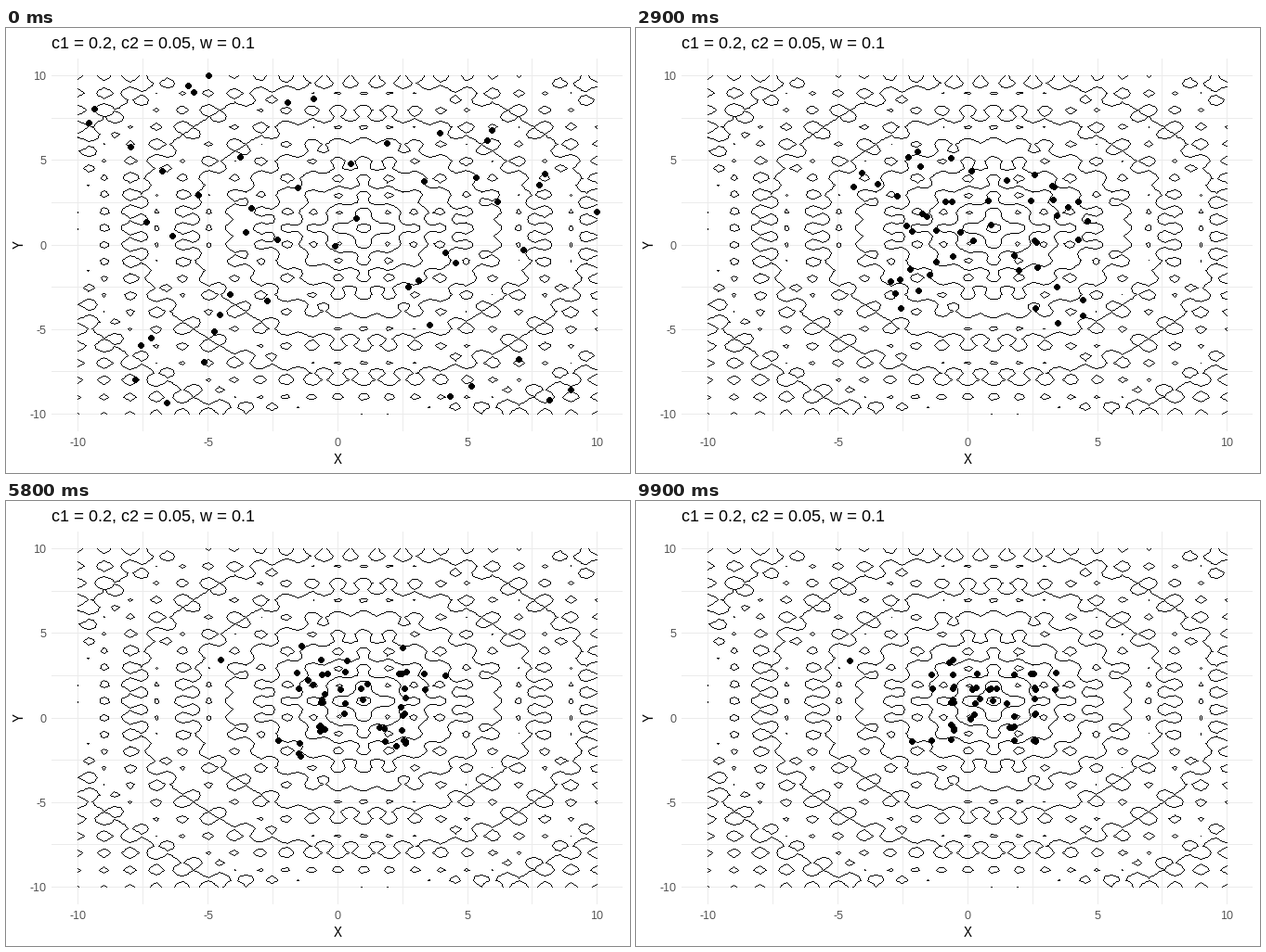
Recreate the animation shown at these times as a matplotlib script. Size 672 px wide and 480 px high, loop 10 s.

```python
import matplotlib.pyplot as plt
import numpy as np
from matplotlib.animation import FuncAnimation
from matplotlib.patches import Circle

W, H, DPI = 672, 480, 96
FRAMES, INTERVAL = 100, 100
PX = 72 / DPI                      # one pixel in points
LEFT, RIGHT, TOP, BOTTOM = 49, 664, 33, 435

# Map from data units to stage pixels
ORIGIN = np.array([357.12, 234.1])
SCALE = np.array([27.98, -18.24])

# Swarm settings
C1, C2, INERTIA = 0.2, 0.05, 0.1
GOAL = np.array([1.0, 1.0])

plt.rcParams.update({
    "font.family": ["Liberation Sans"],
    "text.hinting": "native",
    "text.hinting_factor": 1,
})


def to_px(p):
    return np.floor(ORIGIN + SCALE * np.asarray(p)).astype(int)


def ackley(x, y):
    """Ackley surface with its global minimum moved to (1, 1)."""
    r = np.sqrt(0.5 * ((x - GOAL[0]) ** 2 + (y - GOAL[1]) ** 2))
    ripple = np.exp(0.5 * (np.cos(2 * np.pi * x) + np.cos(2 * np.pi * y)))
    return 20 + np.e - 20 * np.exp(-0.2 * r) - ripple


def fly(pos):
    """Particle swarm: each particle is drawn to its own best and the goal."""
    rng = np.random.default_rng(4)
    vel, best = np.zeros_like(pos), pos.copy()
    path = [pos]
    for _ in range(FRAMES - 1):
        r1, r2 = rng.uniform(0.4, 0.9, (2, *pos.shape))
        vel = INERTIA * vel + C1 * r1 * (best - pos) + C2 * r2 * (GOAL - pos)
        pos = pos + vel
        better = ackley(*pos.T) < ackley(*best.T)
        best = np.where(better[:, None], pos, best)
        path.append(pos)
    return to_px(path) + 0.5


def hairlines(segments):
    """One-pixel lines without smoothing, as a transparent image."""
    image = np.zeros((H, W, 4))
    for seg in segments:
        points = np.floor(seg).astype(int)
        for a, b in zip(points, points[1:]):
            steps = np.linspace(0, 1, np.abs(b - a).max() + 1)[:, None]
            x, y = np.rint(a + (b - a) * steps).astype(int).T
            image[y, x, 3] = 1
    return image


# Where the swarm starts, in stage pixels
START = np.array([
    218, 51, 196, 62, 202, 69, 95, 87, 89, 102, 303, 80, 331, 76, 134, 128,
    168, 154, 252, 139, 410, 124, 467, 113, 523, 110, 518, 121, 371, 146,
    450, 165, 506, 161, 580, 157, 574, 169, 529, 187, 636, 198, 314, 172,
    207, 180, 264, 194, 151, 209, 179, 224, 258, 220, 292, 228, 354, 235,
    377, 205, 473, 242, 484, 253, 557, 239, 433, 279, 444, 272, 241, 287,
    281, 294, 230, 309, 224, 327, 156, 334, 145, 342, 213, 360, 139, 379,
    173, 404, 456, 320, 552, 357, 501, 386, 478, 397, 608, 390, 585, 401,
]).reshape(-1, 2)
path = fly((START + 0.5 - ORIGIN) / SCALE)

fig = plt.figure(figsize=(W / DPI, H / DPI), dpi=DPI, facecolor="white")
ax = fig.add_axes([0, 0, 1, 1])
ax.axis("off")

# Contours of the objective
axis = np.linspace(-10, 10, 100)
gx, gy = np.meshgrid(axis, axis)
contours = ax.contour(ORIGIN[0] + SCALE[0] * gx, ORIGIN[1] + SCALE[1] * gy,
                      ackley(gx, gy), levels=np.arange(2, 20, 2))
segments = [seg for level in contours.allsegs for seg in level]
contours.remove()
ax.imshow(hairlines(segments), extent=(0, W, H, 0), aspect="auto",
          interpolation="nearest", zorder=2)
ax.set(xlim=(0, W), ylim=(H, 0))

# Grid and tick labels
grid = dict(color="#ebebeb", lw=PX, zorder=1, solid_capstyle="butt",
            snap=False)
tick = dict(color="#4d4d4d", size=12 * PX, va="baseline")
for v in np.arange(-10, 10.1, 2.5):
    x, y = to_px((v, v)) + 0.5
    ax.plot([x, x], [TOP, BOTTOM], **grid)
    ax.plot([LEFT, RIGHT], [y, y], **grid)
    if v % 5 == 0:
        ax.text(x, 451, f"{v:.0f}", ha="center", **tick)
        ax.text(43.5, y + 4.5, f"{v:.0f}", ha="right", **tick)

# Titles
ax.text(49, 22, f"c1 = {C1}, c2 = {C2}, w = {INERTIA}", size=18 * PX,
        va="baseline")
ax.text(357, 470, "X", size=15 * PX, ha="center", va="baseline")
ax.text(15, 234, "Y", size=15 * PX, ha="center", va="center", rotation=90)

dots = [ax.add_patch(Circle(p, 2.75, fc="black", lw=0, antialiased=False,
                            zorder=3)) for p in path[0]]


def update(i):
    for dot, p in zip(dots, path[i]):
        dot.center = p
    return dots


anim = FuncAnimation(fig, update, frames=FRAMES, interval=INTERVAL,
                     repeat=True, repeat_delay=0)
plt.show()
```
